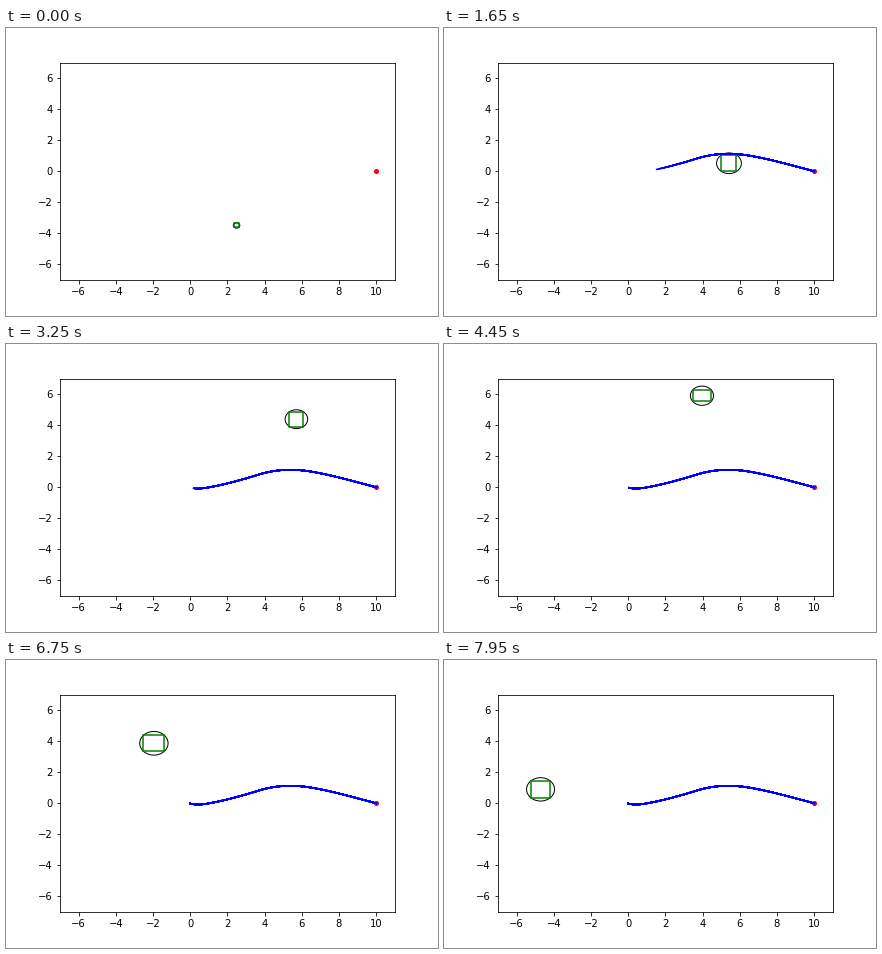
These frames come from a looping animation (432x288 px, 8 s). A matplotlib script:

```python
import numpy as np
import matplotlib.pyplot as plt
from matplotlib.animation import FuncAnimation
from matplotlib.collections import LineCollection
from matplotlib.patches import Circle, Rectangle

FRAMES = 160
STEP_MS = 50
OVERDRAW = 30  # repeated strokes that thicken the older part of the trail
RAMP = 4       # frames until the obstacle box has its full size

# Route of the vehicle, as height over x
ROUTE_X = np.array([0, .3, .7, 1.2, 2, 3, 4.2, 4.7, 5.3, 6, 7, 8, 9, 10])
ROUTE_Y = np.array([-.02, -.08, -.06, .04, .25, .57, .98, 1.08, 1.12, 1.09,
                    .9, .63, .32, 0])
SLOPE = np.gradient(ROUTE_Y, ROUTE_X)


def route(x):
    """Cubic Hermite curve through the route points."""
    i = np.clip(np.searchsorted(ROUTE_X, x) - 1, 0, len(ROUTE_X) - 2)
    h = ROUTE_X[i + 1] - ROUTE_X[i]
    s = (x - ROUTE_X[i]) / h
    left = ROUTE_Y[i] * (1 + 2 * s) + h * SLOPE[i] * s
    right = ROUTE_Y[i + 1] * (3 - 2 * s) - h * SLOPE[i + 1] * (1 - s)
    return left * (1 - s) ** 2 + right * s ** 2


def obstacle(t):
    """Centre, width and height of the obstacle box."""
    a = .0225 * (t - 52)
    b = .0242 * (t - 32.5)
    grown = min(t / RAMP, 1)
    x = 6.13 * np.cos(a) - .16 + .26 * (1 - grown)
    y = 5.56 * np.sin(b) + .45
    w = .58 + .0005 * t + 3.7 * abs(.138 * np.sin(a))
    h = .60 + .0005 * t + 3.3 * abs(.1346 * np.cos(b))
    return x, y, .25 + (w - .25) * grown, .25 + (h - .25) * grown


steps = np.arange(FRAMES)
xs = 10 * np.exp(-.0518 * steps - .000155 * steps ** 2)
path = np.column_stack([xs, route(xs)])

fig, ax = plt.subplots(figsize=(6, 4), dpi=72, facecolor="white")
fig.subplots_adjust(left=.125, right=.9, bottom=.125, top=.88)
ax.set_xlim(-7, 11)
ax.set_ylim(-7, 7)
ax.set_xticks(range(-6, 11, 2))
ax.set_yticks(range(-6, 7, 2))

ax.plot([10], [0], "ro", markersize=4, zorder=1.9)
circle = ax.add_patch(Circle((0, 0), 1, fill=False, ec="black", lw=1))
box = ax.add_patch(Rectangle((0, 0), 1, 1, fill=False, ec="green", lw=1.5))
trail = ax.add_collection(
    LineCollection([], colors="blue", linewidths=1.5, zorder=2,
                   capstyle="projecting", joinstyle="round"),
    autolim=False)


def update(i):
    x, y, w, h = obstacle(i)
    circle.center = x, y
    circle.radius = np.hypot(w, h) / 2
    box.set_bounds(x - w / 2, y - h / 2, w, h)
    first = max(2, i + 2 - OVERDRAW)
    trail.set_segments([path[:n] for n in range(first, i + 2)])
    return circle, box, trail


def reset():
    return update(0)


anim = FuncAnimation(fig, update, frames=FRAMES, init_func=reset,
                     interval=STEP_MS, repeat=True, repeat_delay=0)
plt.show()
```
